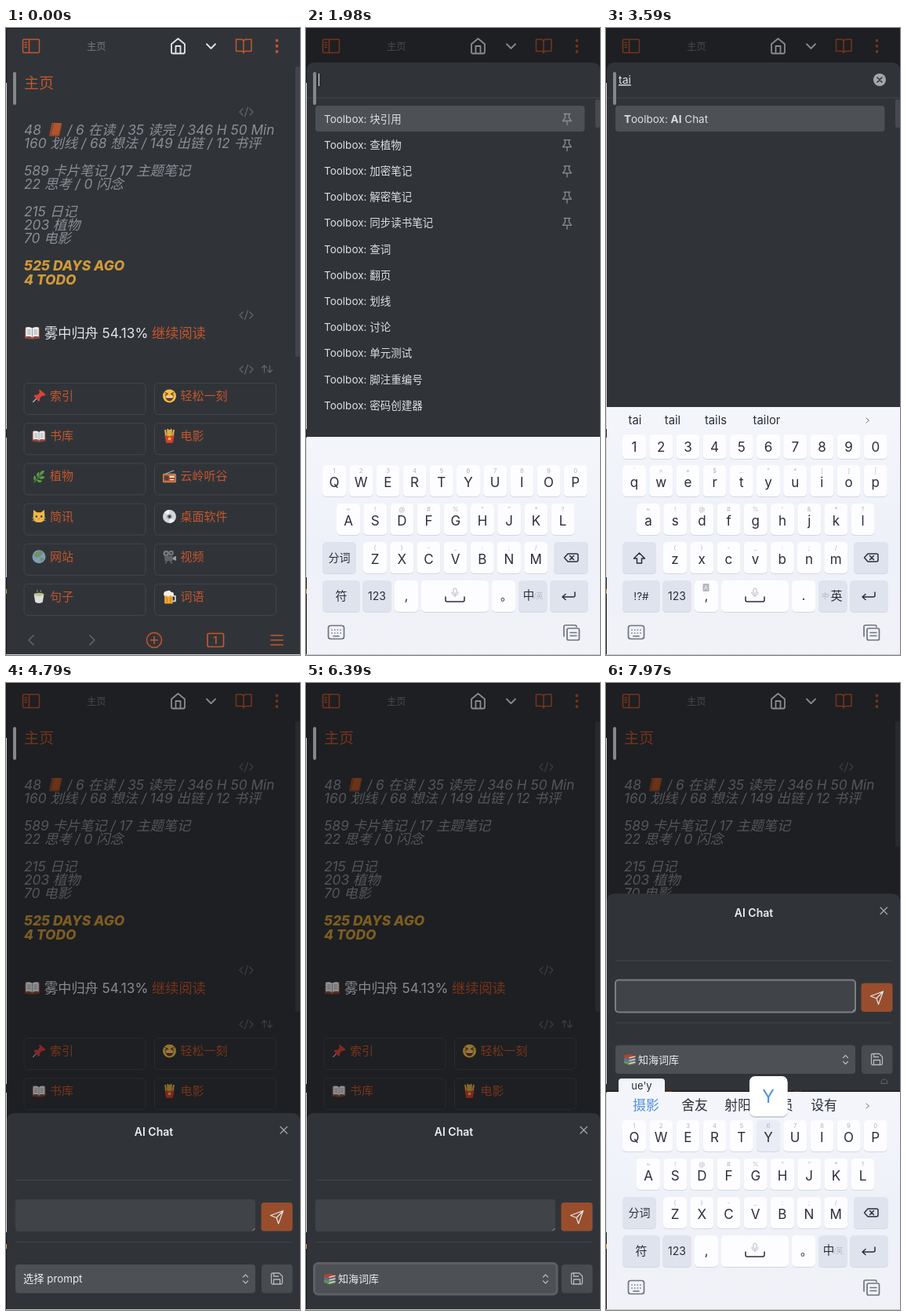
These frames come from a looping animation (375 px wide and 799 px high, 8 s). An HTML page:

```html
<!DOCTYPE html>
<html lang="zh-CN">
<head>
<meta charset="utf-8">
<title>AI Chat</title>
<style>
html, body { margin: 0; width: 100%; height: 100%; overflow: hidden; background: #303439; }
svg { display: block; width: 375px; height: 799px; font-family: Inter, "Noto Sans CJK SC", "Noto Sans CJK", sans-serif; }
text { white-space: pre; }
</style>
</head>
<body>
<svg id="stage" viewBox="0 0 375 799"></svg>
<script>
const BG = '#303439', ORANGE = '#c6552c', WHITE = '#e4e6e9', GREY = '#8b8e93', FAINT = '#62666b', LINE = '#42464b', INK = '#2b2e38';

const rect = (x, y, w, h, fill, rx = 0, more = '') =>
  `<rect x="${x}" y="${y}" width="${w}" height="${h}" rx="${rx}" fill="${fill}" ${more}/>`;
const text = (x, y, size, fill, str, more = '') =>
  `<text x="${x}" y="${y}" font-size="${size}" fill="${fill}" ${more}>${str}</text>`;
const mid = (x, y, size, fill, str, more = '') => text(x, y, size, fill, str, 'text-anchor="middle" ' + more);
const line = (d, color, w = 1.5) =>
  `<path d="${d}" fill="none" stroke="${color}" stroke-width="${w}" stroke-linecap="round" stroke-linejoin="round"/>`;
const area = (d, fill) => `<path d="${d}" fill="${fill}"/>`;
const dot = (x, y, r, fill, more = '') => `<circle cx="${x}" cy="${y}" r="${r}" fill="${fill}" ${more}/>`;
const shade = (a, color = '#000') => rect(0, 0, 375, 799, color, 0, `opacity="${a}"`);
const sheet = (y, fill = BG) => area(`M1 799V${y + 10}q0-10 10-10H365q10 0 10 10V799z`, fill);

// Emoji, each in a 16 by 16 box
const EMOJI = {
  album: area('M5 0h11l-3 14H2z', '#b0552c') + line('M2 14.500h11l3-13', '#8a4526', 1) + line('M6.500 1L3.500 13', '#7d3b20', 1),
  book: area('M0 3l8 1 8-1v11l-8 1-8-1z', '#8c4a3c') + area('M1 2q5-1 7 1q2-2 7-1v10q-5-1-7 1q-2-2-7-1z', '#eceef0') +
    line('M8 3v10M3 5h3M3 7h3M3 9h3M10 5h3M10 7h3M10 9h3', '#9a9da0', .8),
  pin: line('M7 9L1 15', '#b5b8bb', 1.2) + area('M9 0l7 6-2 2-2-.5-3 3 0 3-1.500 1L2 8l1-1.500 3.500 0 2.500-3-1-2z', '#d8433c'),
  laugh: dot(8, 8, 8, '#f6c044') + area('M3 8.500h10q-1 5.500-5 5.500t-5-5.500z', '#713b1d') + rect(4, 8.500, 8, 1.600, '#fff') +
    line('M3 4l3 1.500-3 1.500M13 4l-3 1.500 3 1.500', '#5b3416', 1.1),
  fries: line('M4 8L3 1M6 8V0M8 8V1M10 8V0M12 8l1-7', '#f3bf4a', 1.8) + area('M2 6q6 4 12 0l-2 10H4z', '#d63f2e') + dot(8, 11, 1.800, '#f3bf4a'),
  herb: line('M2 15Q7 10 14 2', '#4b8a37', 1.2) + area('M14 1q-5 0-5 5 5 0 5-5zM8 3q-4 1-2 6 4-2 2-6zM3 7q-3 3 0 6 3-3 0-6zM8 10q4-4 7-1-3 4-7 1zM5 13q4-2 7 1-4 3-7-1z', '#5b9c42'),
  radio: line('M3 5L13 1', '#b0b3b6', 1) + rect(0, 4.500, 16, 11, '#c98a4b', 1.5) + rect(1, 6, 14, 8, '#b4523a', 1) + rect(8, 7, 6, 2.500, '#e9d9b0') + dot(4.500, 10, 2.800, '#4a4340') + line('M9 12h4', '#eee', 1),
  cat: area('M1.500 0l4 3h5l4-3 .5 9q0 6-7 6t-7-6z', '#f0b944') + dot(5, 8, 1.200, '#3a3a30') + dot(11, 8, 1.200, '#3a3a30') + area('M6.500 10h3L8 11.500z', '#cf5a55') + line('M0 10l3 .5M0 13l3-1M16 10l-3 .5M16 13l-3-1', '#a39a85', .7),
  disc: dot(8, 8, 8, '#d3d5d9') + area('M8 8L2 3Q5 0 8 0zM8 8l6 5q-3 3-6 3z', '#f2f3f4') + dot(8, 8, 3, '#8e9296') + dot(8, 8, 1.500, '#33363a'),
  globe: dot(8, 8, 8, '#7ba0b3') + area('M2 4q5-4 9-3l2 3-4 4-4 1-3-2zM9 10q4-2 5 1-2 3-4 3z', '#74906b'),
  camera: dot(4, 4, 3.500, '#77797c') + dot(10, 3.500, 3, '#77797c') + dot(4, 4, 1.200, '#34373a') + dot(10, 3.500, 1.100, '#34373a') + rect(2, 7, 10, 6, '#606266', 1) + area('M12 9l4-2v6l-4-2z', '#9b9da0') + line('M5 13l-2 3M9 13l2 3', '#77797c', 1),
  tea: area('M2 5h12l-1.500 9q-4.500 3-9 0z', '#dcdcda') + `<ellipse cx="8" cy="5" rx="6" ry="2" fill="#b9c08c"/>` + line('M6 2q1-1 0-2M10 2q1-1 0-2', '#b9bcc0', .8),
  beer: line('M11 7h4v6h-4', '#d7d9da', 1.6) + rect(2, 4, 10, 12, '#eda736', 1) + area('M1 5q0-4 4-4 3-2 5 1 4 0 3 4l-2 1-2-1-2 2-3-2-2 1z', '#f5f0e4') + line('M5 9v5M9 9v5', '#c77c22', 1),
  // Three stacked volumes with pale page edges
  books: [[10, '#6f8f4e'], [6, '#4a7896'], [2, '#a8463a']].map(([y, c]) =>
    area(`M0 ${y}l9-1.500 7 2.500v3l-9 2-7-3z`, c) + area(`M7 ${y + 3}l9-2v1.500l-9 2z`, '#dcdad4')).join(''),
  lens: line('M10.500 10.500l4.500 4.500', '#5f6c78', 2.300) + dot(6.500, 6.500, 5.500, '#d5e4ec', 'stroke="#8a949c" stroke-width="1.300"') + line('M4 5q1-2 3-2', '#fff', 1),
  mic: line('M10 6L1 15', '#5c5f63', 2.400) + dot(11.500, 4.500, 4.300, '#8d9094') + line('M9 2l5 5M8 5l3 3M12 1l3 3', '#696c70', .7),
  cycle: rect(0, 0, 16, 16, '#7fa3b4', 2) + line('M3 7.500q0-3.500 4-3.500h5M10 1.500l2.500 2.500L10 6.500M13 8.500q0 3.500-4 3.500H4M6 9.500L3.500 12 6 14.500', '#fff', 1.6),
};
const emoji = (name, x, y, size) => `<g transform="translate(${x} ${y}) scale(${size / 16})">${EMOJI[name]}</g>`;

const codeMark = y => line(`M302 ${y - 4}l-4 4 4 4M311 ${y - 4}l4 4-4 4M308.500 ${y - 6}l-4 12`, FAINT, 1.2);

const STATS = [
  [153, '160 划线 / 68 想法 / 149 出链 / 12 书评'], [188, '589 卡片笔记 / 17 主题笔记'], [205, '22 思考 / 0 闪念'],
  [240, '215 日记'], [257, '203 植物'], [274, '70 电影'],
];
const LINKS = [
  ['pin', '索引'], ['laugh', '轻松一刻'], ['book', '书库'], ['fries', '电影'], ['herb', '植物'], ['radio', '云岭听谷'],
  ['cat', '简讯'], ['disc', '桌面软件'], ['globe', '网站'], ['camera', '视频'], ['tea', '句子'], ['beer', '词语'],
];

function home(thumb = 370) {
  const it = 'font-style="italic"';
  let s = rect(0, 0, 375, 799, BG) + rect(369, 49, 6, thumb, '#414549', 2);
  s += line('M23 14.500h18q1.500 0 1.500 1.500v14q0 1.500-1.500 1.500H23q-1.500 0-1.500-1.500V16q0-1.500 1.500-1.500zM29.500 14.500v17M24 18.500h2.500M24 21.500h2.500M24 24.500h2.500', ORANGE);
  s += text(103, 27.5, 12.3, '#777a7f', '主页');
  s += line('M211 20.500l8.500-7 8.500 7v10q0 2-2 2H213q-2 0-2-2zM216.500 32v-9h6v9', WHITE, 1.8) + line('M256 20.500l5.500 5.500 5.500-5.500', WHITE, 1.8);
  s += line('M303 17.500q0-3-3-3h-6.500v15h7q2.500 0 2.500 2.500 0-2.500 2.500-2.500h7.500v-15H306q-3 0-3 3zV31', ORANGE);
  s += [16, 23, 30].map(y => dot(345.5, y, 1.9, ORANGE)).join('');
  s += text(23, 76.5, 19, ORANGE, '主页') + codeMark(107) + codeMark(366) + codeMark(435);
  s += line('M329.500 439v-9l-3 3M329.500 430l3 3M336.500 430v9l-3-3M336.500 439l3-3', FAINT, 1.2);
  s += text(23, 136, 17.3, GREY, '48', it) + emoji('album', 53, 121, 18) + text(78, 136, 17.3, GREY, '/ 6 在读 / 35 读完 / 346 H 50 Min', it);
  s += STATS.map(([y, str]) => text(23, y, 17.3, GREY, str, it)).join('');
  s += text(23, 309, 17.4, '#d09a38', '525 DAYS AGO', it + ' font-weight="800"') + text(23, 326.5, 17.4, '#d09a38', '4 TODO', it + ' font-weight="800"');
  s += emoji('book', 24, 379, 19) + text(49, 395, 17.2, WHITE, '雾中归舟 54.13%') + text(186, 395, 17.2, ORANGE, '继续阅读');
  LINKS.forEach(([icon, label], i) => {
    const x = 23 + i % 2 * 166.5, y = 452.5 + (i >> 1) * 51.2;
    s += rect(x, y, 155, 40, 'none', 5, `stroke="${LINE}"`) + emoji(icon, x + 10.5, y + 8, 17) + text(x + 33, y + 21.5, 15, ORANGE, label);
  });
  s += line('M35 774l-6 6 6 6M107 774l6 6-6 6', FAINT, 1.6);
  s += line('M189 775.500v9M184.500 780h9', ORANGE) + dot(189, 780, 9.5, 'none', `stroke="${ORANGE}" stroke-width="1.500"`);
  s += rect(257, 771.5, 20.5, 17, 'none', 2, `stroke="${ORANGE}" stroke-width="1.700"`) + mid(267, 784.5, 12.5, ORANGE, '1', 'font-weight="600"');
  return s + line('M338 774h15M338 780h15M338 786h15', ORANGE, 1.7);
}

const PINNED = ['块引用', '查植物', '加密笔记', '解密笔记', '同步读书笔记'];
const COMMANDS = ['查词', '翻页', '划线', '讨论', '块引用', '查植物', '加密笔记', '解密笔记', '单元测试', '脚注重编号', '密码创建器', '同步读书笔记'];
const PINNED_FIRST = [...PINNED, ...COMMANDS.filter(c => !PINNED.includes(c))];

function palette(query, commands) {
  let s = home() + shade(.4) + sheet(44) + rect(1, 88.5, 374, 1, LINE) + rect(369, 91, 6, 36, '#46494e', 2);
  if (query) {
    s += text(16, 71, 14, WHITE, query, 'text-decoration="underline"');
    s += dot(349, 66, 8, '#a5a7aa') + line('M346 63l6 6M352 63l-6 6', BG, 1.6);
  } else s += rect(16, 58, 1, 16, WHITE);
  s += rect(12, 99, 343.5, 33, '#4d5054', 4);
  commands.forEach((name, i) => {
    const y = 115.5 + i * 33.2, bold = 'font-weight="700"';
    const t = query ? `<tspan ${bold}>T</tspan>` : 'T';
    const label = query.length > 1 ? `<tspan ${bold}>${name.slice(0, query.length - 1)}</tspan>${name.slice(query.length - 1)}` : name;
    s += text(23, y + 5, 13.5, '#dcdee1', `${t}oolbox: ${label}`);
    if (PINNED.includes(name))
      s += line(`M329 ${y - 6}h8M330.500 ${y - 6}v5l-3 4h11l-3-4v-5M333 ${y + 3}v5`, GREY, 1.3);
  });
  return s;
}

const key = (x, y, w, h, fill = '#fdfdff') => rect(x, y + 1, w, h, '#d3d7e2', 5) + rect(x, y, w, h, fill, 5);
const SPECIAL = '#dfe3ee', HINT = '#b3b6bf';
const ROWS = [[36, 557, 'qwertyuiop'], [54, 606, 'asdfghjkl'], [88, 655, 'zxcvbnm']];
const HINTS = {
  en: ['`=+$…"*[]|', "~!@#%'&*?", '()-_:;/'],
  zh: ['1234567890', '~!@#%“”*?', '()-_:;/'],
};
const esc = c => c === '&' ? '&amp;' : c;

function keyboard({ lang = 'zh', words, typed, pressed, blank }) {
  const zh = lang === 'zh', tall = !zh && words, top = tall ? 483 : 521;
  if (blank) return rect(1, top, 374, 278, '#fbfafd');
  let s = rect(1, top, 374, 799 - top, 'url(#board)');
  if (typed) s += area('M16 522v-14q0-4 4-4h51q4 0 4 4v14z', '#f3f5fa') + mid(45.5, 518, 13, INK, typed) + line('M351 510q0-5 4-5t4 5z', FAINT, 1);
  const wy = zh ? 544 : 505, size = zh ? 16.8 : 14.8;
  (words || []).forEach(([x, w], i) => s += mid(x, wy, size, zh && !i ? '#4f91dc' : INK, w));
  if (words) s += line(`M332 ${wy - 8}l3.500 3-3.500 3`, '#70747e', 1);
  if (tall) for (let i = 0; i < 10; i++)
    s += key(21 + i * 34.2, 518, 30, 31) + mid(36 + i * 34.2, 539.5, 17, INK, (i + 1) % 10);
  ROWS.forEach(([x0, y, chars], r) => [...chars].forEach((c, i) => {
    const x = x0 + i * 34.2;
    s += key(x - 15, y, 30, 40, c === pressed ? '#e9ecf5' : undefined) + mid(x, y + 9.5, 8, HINT, esc(HINTS[lang][r][i]));
    s += mid(x, y + 27.5, 17, INK, zh ? c.toUpperCase() : c);
  }));
  s += key(21, 655, 43, 40, SPECIAL) + key(316, 655, 44, 40, SPECIAL);
  s += zh ? mid(42.5, 680, 14, INK, '分词') : line('M42.500 669l7 7h-4v6h-6v-6h-4z', INK, 1.5);
  s += line('M334 670h11q2 0 2 2v6q0 2-2 2h-11l-4.500-5zM336.500 672.500l5 5M341.500 672.500l-5 5', INK, 1.5);
  s += [[21, 48, SPECIAL], [72, 37, SPECIAL], [113, 30], [147, 86], [237, 30], [271, 36.5, SPECIAL], [311, 49, SPECIAL]]
    .map(([x, w, fill]) => key(x, 704, w, 40, fill)).join('');
  s += mid(45, 729, zh ? 15 : 13.5, INK, zh ? '符' : '!?#') + mid(90.5, 729, 14, INK, '123');
  s += mid(128, 729, 16, INK, ',') + (zh ? text(248, 729, 15, INK, '。') : mid(252, 729, 17, INK, '.'));
  if (!zh) s += rect(123.5, 708, 8, 10, HINT, 1) + mid(127.5, 715.5, 7, '#fff', 'A');
  s += zh ? mid(284, 728, 14.5, INK, '中') + text(290, 727, 9, HINT, '/英') : text(275, 727, 9.5, HINT, '中') + mid(294, 729, 15, INK, '英');
  s += line('M178 725v4q0 2 2 2h20q2 0 2-2v-4', INK, 1.5);
  s += rect(188, 714, 4, 7, 'none', 2, `stroke="${HINT}"`) + line('M186 719q0 4 4 4t4-4M190 723v2', HINT, 1);
  s += line('M343 719v4q0 2-2 2h-13M331 721.500l-4 3.500 4 3.500', INK, 1.5);
  const tool = '#70747e';
  s += rect(28.5, 761.5, 20, 17, 'none', 3, `stroke="${tool}" stroke-width="1.700"`) + line('M33 767h.1M36.700 767h.1M40.300 767h.1M44 767h.1M33 771h.1M36.700 771h.1M40.300 771h.1M44 771h.1M35 775h7', tool, 1.7);
  s += line('M329 775v-12q0-2 2-2h12q2 0 2 2', tool, 1.7) + rect(333, 765, 15.5, 15, 'none', 2, `stroke="${tool}" stroke-width="1.700"`) + line('M337 770.500h8M337 774.500h8', tool);
  if (pressed) s += rect(183, 502, 48.5, 52, '#c9cedb', 7) + rect(183, 501, 48.5, 51, '#fff', 7) + mid(207, 535, 23, '#4f91dc', pressed.toUpperCase());
  return s;
}

const PROMPTS = [['books', '知海词库'], ['lens', '正则表达式生成器'], ['mic', '脱口秀喜剧演员'], ['cycle', '中文翻译员']];

function chat({ prompt, focus, lift = 0 }) {
  let s = sheet(548) + mid(188.5, 577, 14, '#eceef0', 'AI Chat', 'font-weight="600"') + line('M350 565.500l8.500 8.500M358.500 565.500l-8.500 8.500', '#a3a6aa', 1.3);
  s += rect(12, 633, 353, 1, LINE) + rect(12, 712, 353, 1, LINE);
  s += rect(12, 658, 306, 41, '#404347', 4, focus === 'input' ? 'stroke="#7b7e83" stroke-width="2"' : '') + line('M315 697.500l2-2', '#c8cacd', .8);
  s += rect(325.5, 662, 40, 36.5, '#984e2d', 4) + line('M353.500 672.500l-16 6 7.500 3 2.500 7.500zL345 681.500', WHITE, 1.2);
  if (focus === 'select') s += rect(10.5, 739.5, 309.5, 39.5, '#4d5054', 5, 'stroke="#5d6064" stroke-width="3"');
  else s += rect(12, 741, 306, 36.5, '#4d5054', 4);
  s += prompt ? emoji('books', 23, 752, 14.5) + text(41, 764, 13, '#eceef0', prompt) : text(22, 764, 13.3, '#eceef0', '选择 prompt');
  s += line('M302.500 757l3-3 3 3M302.500 762l3 3 3-3', '#b5b8bb', 1.2) + rect(326, 741, 39.5, 36.5, '#484b50', 4);
  s += line('M340 752h8.500l4 4v8.500q0 1.500-1.500 1.500H340q-1.500 0-1.500-1.500v-11q0-1.500 1.500-1.500zM341.500 766v-6h8v6M341.500 752v4h6', '#b5b8bb', 1.3);
  return home(lift ? 160 : 370) + shade(.4) + `<g transform="translate(0 ${-lift})">${s}</g>`;
}

function picker() {
  const thin = 'font-weight="300"', ink = '#333';
  const radio = (y, on) => dot(330.5, y, 8.7, 'none', `stroke="${on ? '#2f8284' : '#707070'}" stroke-width="1.800"`) + (on ? dot(330.5, y, 5, '#2f8284') : '');
  let s = chat({ focus: 'select' }) + shade(.6, '#020002') + rect(25, 253, 327, 296, '#fff', 2);
  s += text(37, 289.5, 19.3, ink, '选择 <tspan font-size="16.500">prompt</tspan>', thin) + radio(282, true);
  PROMPTS.forEach(([icon, label], i) => {
    const y = 341.5 + i * 59.3;
    s += rect(25, y - 30.5, 327, 1.5, '#d8d9db') + emoji(icon, 37, y - 11, 23) + text(68, y + 7.5, 20, ink, label, thin) + radio(y);
  });
  return s;
}

const T_WORDS = [[37, 't'], [75, 'to'], [114, 'the'], [164.5, 'thank'], [217.5, 'that'], [265.5, 'this'], [304, 'tl']];
const TA_WORDS = [[37, 'ta'], [80, 'take'], [130, 'talk'], [185, 'taken'], [245, 'taking']];
const TAI_WORDS = [[37, 'tai'], [85, 'tail'], [140, 'tails'], [205, 'tailor']];
const UE_WORDS = [[51, '设'], [104, '社'], [157, '射'], [210, '摄'], [263, '舍']];
const UEY_WORDS = [[51, '摄影'], [113, '舍友'], [168, '射阳'], [222, '社员'], [278, '设有']];
const lifted = () => chat({ prompt: PROMPTS[0][1], focus: 'input', lift: 279.5 });

const SCENES = [
  [0, () => home()],
  [1170, () => home() + keyboard({ blank: true })],
  [1580, () => palette('', PINNED_FIRST) + keyboard({})],
  [2380, () => palette('t', PINNED_FIRST) + keyboard({ lang: 'en' })],
  [2790, () => palette('t', COMMANDS) + keyboard({ lang: 'en', words: T_WORDS })],
  [3190, () => palette('ta', ['AI Chat']) + keyboard({ lang: 'en', words: TA_WORDS })],
  [3590, () => palette('tai', ['AI Chat']) + keyboard({ lang: 'en', words: TAI_WORDS })],
  [3990, () => chat({})],
  [5190, picker],
  [6390, () => chat({ prompt: PROMPTS[0][1], focus: 'select' })],
  [6780, () => lifted() + keyboard({ blank: true })],
  [7180, () => lifted() + keyboard({})],
  [7570, () => lifted() + keyboard({ words: UE_WORDS, typed: 'ue' })],
  [7970, () => lifted() + keyboard({ words: UEY_WORDS, typed: "ue'y", pressed: 'y' })],
];

const DEFS = '<defs><linearGradient id="board" x2="0" y2="1"><stop stop-color="#f4f6fb"/><stop offset=".5" stop-color="#eef1f8"/><stop offset="1" stop-color="#f1f2f8"/></linearGradient></defs>';
// Screen edge and the grey side handle stay above everything
const EDGE = rect(0, 0, 375, 1, '#17191c') + rect(0, 0, 1, 799, '#17191c') + rect(0, 70, 1, 630, '#d5d6d8') + rect(0, 511, 1, 11, '#222') +
  rect(0, 715, 1, 6, '#d99a2b') + rect(0, 798, 375, 1, '#c9cacc') + rect(9, 56, 4, 42, '#85878a', 2);

const stage = document.getElementById('stage');
let shown;
function draw() {
  const t = performance.now() % 8000;
  const scene = SCENES.findLast(([start]) => t >= start);
  if (scene !== shown) {
    shown = scene;
    stage.innerHTML = DEFS + scene[1]() + EDGE;
  }
  requestAnimationFrame(draw);
}
draw();
</script>
</body>
</html>
```
